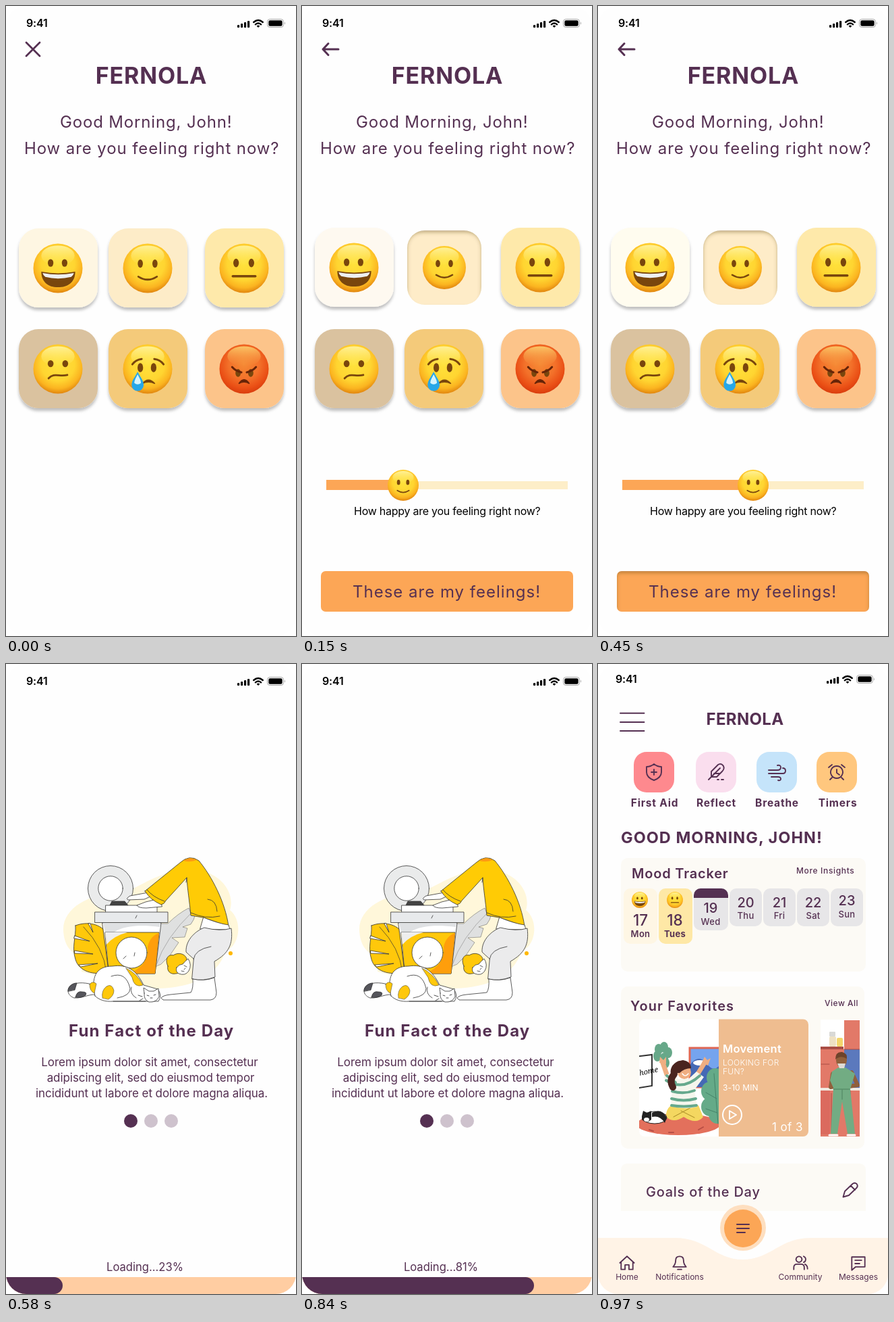
Animation of 430x932 px, one loop 1470 ms. Source, as an HTML page:

```html
<!DOCTYPE html>
<html lang="en">
<head>
<meta charset="utf-8">
<title>Mood check-in</title>
<style>
html,body{margin:0;width:100%;height:100%;overflow:hidden;background:#fff}
svg{display:block;width:430px;height:932px}
text{font-family:Inter,sans-serif;white-space:pre}
</style>
</head>
<body>
<svg id="stage" viewBox="0 0 430 932" xmlns="http://www.w3.org/2000/svg"></svg>
<script>
const INK = '#553052', ORANGE = '#fca656', LOOP = 1470;

const text = (x, y, size, str, o = {}) =>
  `<text x="${x}" y="${y}" font-size="${size}" font-weight="${o.w || 400}" letter-spacing="${o.ls || 0}"
   fill="${o.fill || INK}" text-anchor="${o.mid ? 'middle' : 'start'}"${o.id ? ` id="${o.id}"` : ''}>${str}</text>`;
const rect = (x, y, w, h, r, fill, more = '') =>
  `<rect x="${x}" y="${y}" width="${w}" height="${h}" rx="${r}" fill="${fill}" ${more}/>`;
const disc = (x, y, r, fill, more = '') => `<circle cx="${x}" cy="${y}" r="${r}" fill="${fill}" ${more}/>`;
const oval = (x, y, a, b, fill, more = '') => `<ellipse cx="${x}" cy="${y}" rx="${a}" ry="${b}" fill="${fill}" ${more}/>`;
const shape = (d, fill, more = '') => `<path d="${d}" fill="${fill}" ${more}/>`;
const line = (d, w = 1.9, color = INK) =>
  `<path d="${d}" fill="none" stroke="${color}" stroke-width="${w}" stroke-linecap="round" stroke-linejoin="round"/>`;
const group = (id, body, more = '') => `<g id="${id}" ${more}>${body}</g>`;
const at = (x, y, body, s = 1) => `<g transform="translate(${x} ${y}) scale(${s})">${body}</g>`;

const ramp = (id, stops) => `<radialGradient id="${id}" cx=".5" cy=".4" r=".62">` +
  stops.map(([o, c]) => `<stop offset="${o}" stop-color="${c}"/>`).join('') + '</radialGradient>';
const clip = (id, body) => `<clipPath id="${id}">${body}</clipPath>`;
const defs = `<defs>
  ${ramp('sun', [[0, '#ffe23c'], [.55, '#ffd531'], [.8, '#fbb420'], [1, '#dc7d0c']])}
  ${ramp('rage', [[0, '#f58a35'], [.5, '#f3712a'], [.8, '#ea4f15'], [1, '#d63a0c']])}
  <linearGradient id="gloss" x2="0" y2="1"><stop stop-color="#fff6a8" stop-opacity=".85"/><stop offset="1" stop-color="#fff07a" stop-opacity="0"/></linearGradient>
  <linearGradient id="amber" x2="0" y2="1"><stop stop-color="#fcd06c" stop-opacity=".9"/><stop offset="1" stop-color="#f9a04a" stop-opacity="0"/></linearGradient>
  <filter id="drop" x="-20%" y="-20%" width="140%" height="150%"><feDropShadow dx="0" dy="4" stdDeviation="2.2" flood-opacity=".25"/></filter>
  <filter id="soft" x="-20%" y="-20%" width="140%" height="140%"><feGaussianBlur stdDeviation="3"/></filter>
  ${clip('screen', rect(0, 0, 430, 932, 30, '#000'))}
  ${clip('well', rect(156, 332, 110, 110, 26, '#000'))}
  ${clip('key', rect(28, 836, 374, 60, 7, '#000'))}
  ${clip('fav', rect(61, 525.5, 251, 173.5, 8, '#000'))}
  ${clip('next', '<path d="M388 525H330V699H388Z"/>')}
  ${clip('day', rect(142, 332, 51, 62, 10, '#000'))}
</defs>`;

// Faces are drawn around 0,0 with radius 37.
const BROWN = '#79460d';
const eyes = (x1, x2, y, a, b) => oval(x1, y, a, b, BROWN) + oval(x2, y, a, b, BROWN);
const features = {
  grin: eyes(-11, 10, -8, 4.2, 5.8) +
    shape('M-25 5Q0 10 26 5C26 21 15 28.5 0 28.5S-25 20-25 5Z', BROWN) +
    shape('M-23 7Q0 12 24 7Q23 11 20 13Q0 18-19 13Q-22 11-23 7Z', '#eef0f2'),
  smile: eyes(-11, 11, -7, 3.9, 6.2) + line('M-14 12.5Q0 21.5 14 12.5', 2.8, BROWN),
  flat: eyes(-12, 11, -8, 4.2, 6.4) + line('M-17 12H17', 3.5, BROWN),
  unsure: eyes(-11, 11, -8, 4.4, 5.2) + line('M-14 14C-6 5 2 12 14 9', 3, BROWN),
  cry: eyes(-11, 9, -2, 4.2, 6.8) + line('M-23-7Q-18-14-9-15M10-15Q19-14 24-7', 3, BROWN) +
    shape('M-8 22Q1 11 11 22Q1 17-8 22Z', BROWN, `stroke="${BROWN}" stroke-width="1.5"`) +
    shape('M-15 4C-11 12-6 17-6 24A9 9 0 0 1-24 24C-24 17-19 12-15 4Z', '#27a7e8') +
    shape('M-15 8C-12 14-10 17-10 21Q-15 25-20 21C-20 17-18 14-15 8Z', '#d5f3fb'),
  cross: eyes(-9, 10, 6, 4, 6) + line('M-18-3Q-13 3-4 5M18-3Q13 3 4 5', 3, '#672408') +
    shape('M-8 22Q0 10 8 22Q0 17-8 22Z', '#672408', 'stroke="#672408" stroke-width="1.5"')
};
const face = (kind, x, y, r = 36.5) => {
  const hot = kind === 'cross';
  return at(x, y, disc(0, 0, 37, `url(#${hot ? 'rage' : 'sun'})`) +
    oval(0, -19, 25, 15, `url(#${hot ? 'amber' : 'gloss'})`) + features[kind], r / 37);
};
const card = (kind, x, y, fill, id = '') =>
  rect(x, y, 117, 117, 29, fill, `filter="url(#drop)" ${id && `id="${id}"`}`) + face(kind, x + 58, y + 59);

const status = [0, 1, 2, 3].map(i => rect(343 + i * 5, 28 - i * 2, 3.2, 4 + i * 2, 1, '#000')).join('') +
  text(30, 31, 16, '9:41', { w: 600, ls: -.2, fill: '#000' }) +
  line('M367.2 24Q374 18 380.8 24', 2.4, '#000') + line('M369.8 27.3Q374 23.8 378.2 27.3', 2.3, '#000') +
  shape('M371.6 29.5Q374 27.6 376.4 29.5L374 32Z', '#000') +
  rect(387.5, 19.5, 24, 12, 3.8, 'none', 'stroke="#a5a5a5"') + rect(389.3, 21.3, 20.4, 8.4, 2.3, '#000') +
  shape('M413 23.6Q415 25.5 413 27.5Z', '#aaa');

const inset = (id, x, y, w, h, r) => `<g clip-path="url(#${id})"><rect x="${x - 4}" y="${y - 1}" width="${w + 8}" height="${h + 10}"
  rx="${r}" fill="none" stroke="#5a4010" stroke-opacity=".5" stroke-width="6" filter="url(#soft)"/></g>`;

const ask =
  text(215.5, 115, 34, 'FERNOLA', { w: 700, ls: .8, mid: 1 }) +
  text(80, 180, 24, 'Good Morning, John!', { ls: .84 }) +
  text(27, 219, 24, 'How are you feeling right now?', { ls: .9 }) +
  group('closeIcon', line('M30 54L50 74M50 54L30 74', 2.8)) +
  group('backIcon', line('M54 64H31M39 55.5L31 64L39 72.5', 3)) +
  group('rowOne', card('grin', 19, 329, '#fef6e2', 'first') + card('flat', 295, 329, '#fee9aa')) +
  group('idle', card('smile', 152, 329, '#fdecc8')) +
  card('unsure', 19, 478, '#dac29f') + card('cry', 152, 478, '#f4ca7a') + card('cross', 295, 478, '#fcc48a') +
  group('chosen', rect(156, 332, 110, 110, 26, '#feecc8') + inset('well', 156, 332, 110, 110, 26) +
    face('smile', 211, 387, 32) +
    rect(36, 703, 358, 12, 0, '#fdeec8') + rect(36, 701, 100, 15, 0, ORANGE, 'id="fill"') +
    group('thumb', face('smile', 0, 0, 23)) +
    text(77, 753, 16, 'How happy are you feeling right now?', { ls: -.25, fill: '#000' }) +
    rect(28, 836, 374, 60, 7, ORANGE) + group('pressed', inset('key', 28, 836, 374, 60, 7)) +
    text(75, 875, 24, 'These are my feelings!', { ls: 1 }));

const art = `<g stroke="#333" stroke-width=".8" stroke-linejoin="round" stroke-linecap="round">` +
  shape('M85 394C84 358 130 337 172 340C198 330 230 305 270 304C320 304 340 340 332 364C352 380 346 418 326 424C312 466 270 482 205 480L112 455C112 445 119 441 112 432C94 428 86 414 85 394Z', '#fff7da', 'stroke="none"') +
  disc(333, 428, 3, '#ffb800', 'stroke="none"') +
  disc(155, 332, 33.5, '#eaebeb') + disc(155, 332, 18.2, '#fff') +
  shape('M103 387C121 380 141 385 149 398L152 456C130 461 108 455 103 437C97 418 104 405 103 387Z', '#ffc80b') +
  shape('M102 402L124 410L101 406ZM102 424L129 429L102 428ZM108 445L136 443L111 448ZM122 384L129 397L125 384Z', '#fff') +
  line('M115 389Q145 420 149 456', .7, '#333') +
  shape('M222 447L227 384H240Q255 369 271 361L275 371L281 369Q279 379 274 385L262 389L269 391L265 404L246 405L256 412L243 431L230 444Z', '#dfe0e0', 'stroke-width=".4"') +
  line('M223 445Q236 405 277 366', .5, '#777') +
  shape('M143 383H230L221 458H153Z', '#fff') + shape('M144 383H229L228 389C203 386 175 386 160 397H147Z', '#dfe1e3', 'stroke="none"') +
  shape('M147 397H227L221 458H153Z', '#ffc80b') + shape('M227 398L221 458H183Q213 445 210 418Q214 402 227 398Z', '#ff9e0b', 'stroke="none"') +
  shape('M147 397H180Q160 402 149 415Z', '#eee', 'stroke="none"') + disc(186, 427, 23, '#fff') +
  line('M174 436L178 432M190 432L191 427', .8, '#333') +
  shape('M154 357L157 351H176L181 357Z', '#444') + rect(148, 357, 76, 10.5, 0, '#fff') + rect(132, 367, 108, 15.5, 0, '#e8eaec') +
  line('M192 376L194 372', .8, '#333') +
  shape('M211 338L184 343Q177 347 181 349L205 348L221 341ZM228 347L207 352L194 357Q196 361 208 361L231 359Z', '#fff') +
  shape('M206 336L258 294Q272 281 286 291C305 314 325 352 330 388L292 375L274 372C272 350 269 333 268 316L237 350Q235 355 230 356Q214 349 206 336Z', '#ffcb05') +
  shape('M263 291Q273 284 283 290Q272 294 263 291Z', '#ff9a12', 'stroke="none"') +
  line('M268 316L267 323M209 334Q218 345 235 351M299 348Q312 349 313 366M274 368Q296 378 317 373', .8, '#333') +
  shape('M293 375Q315 384 330 386L332 393Q310 393 288 392Z', '#fff') +
  shape('M278 436Q271 430 267 426C266 407 283 394 294 390Q318 396 334 391C337 415 330 428 309 440L310 463Q292 470 276 466Z', '#ebebec') +
  line('M278 437Q280 422 304 418', .8, '#333') +
  shape('M277 466Q278 480 274 486L244 489Q233 490 230 494L233 497H303Q312 496 312 486L309 464Q293 470 277 466Z', '#fff') +
  shape('M240 447C234 434 243 429 248 431C258 424 272 432 267 442C266 452 258 458 252 458C244 460 238 454 240 447Z', '#ffc80b') +
  shape('M253 449Q257 444 262 444Q266 439 270 436Q276 445 271 454Q266 462 256 458Q251 455 253 449Z', '#fff') +
  line('M264 446L268 448M260 454L264 455M266 450L264 452', .8, '#333') +
  shape('M135 476C119 471 106 470 97 475C88 481 92 491 101 494C116 495 124 486 138 490Z', '#fff') +
  shape('M92 484C92 476 99 472 105 472L102 482ZM103 493Q105 483 113 485Q121 485 118 490Q111 495 103 493Z', '#55555b') +
  shape('M132 491C126 465 132 447 158 447C179 444 193 452 204 475L225 481Q232 490 226 499L159 499C147 500 138 497 132 491Z', '#fff') +
  shape('M143 494Q141 483 149 477Q157 472 160 483Q160 491 152 496ZM124 474Q128 468 134 473L131 487Q124 484 124 474ZM178 450Q194 457 203 475Q190 480 187 464Z', '#ffc80b', 'stroke-width=".5"') +
  line('M156 462Q178 454 184 480Q184 491 165 494M186 478Q183 488 193 494M159 499H207', .8, '#333') +
  shape('M205 487L204 479L212 484L219 484L226 480L227 492Q223 501 212 500Q204 497 205 487Z', '#fff') +
  line('M209 490L212 491M219 490L222 489M214 494L217 494M202 492L196 490M203 495L198 498', .8, '#222') + '</g>';

const load = art +
  text(93, 551, 24, 'Fun Fact of the Day', { w: 700, ls: 1.12 }) +
  ['Lorem ipsum dolor sit amet, consectetur', 'adipiscing elit, sed do eiusmod tempor',
    'incididunt ut labore et dolore magna aliqua.'].map((s, i) =>
    text(213 + i * 1.5, 595 + i * 23, 17, s, { ls: -.06, mid: 1 })).join('') +
  disc(185, 676, 10, INK) + disc(215, 676, 10, '#cec2cd') + disc(245, 676, 10, '#cec2cd') +
  text(206, 898, 16.6, '', { mid: 1, id: 'percent' }) +
  rect(0, 907, 430, 25, 0, '#ffcda2') + rect(-30, 907, 100, 25, 12.5, INK, 'id="bar"');

const tile = (x, fill, icon, name, mid) => rect(x, 130, 60, 60, 19, fill) + at(x + 30, 160, icon) +
  text(mid, 211, 15.5, name, { w: 700, ls: .8, mid: 1 });
const day = (x, h, fill, num, name, mid, y, w = 48, size = 20, bold = 500) => rect(x, 332, w, h, 10, fill) +
  text(mid, y, size, num, { w: 500, mid: 1 }) + text(mid, y + 17.5, 13, name, { w: bold, ls: .3, mid: 1 });

const yoga = `<g clip-path="url(#fav)">` + rect(61, 525, 118, 175, 0, '#fff') +
  shape('M55 581L80 578V624L55 628Z', '#fff', 'stroke="#333" stroke-width="2"') +
  '<text x="62" y="609" font-size="11" font-style="italic" transform="rotate(-12 62 609)" style="font-family:\'Noto Serif\',serif">home</text>' +
  rect(136, 568, 50, 58, 0, '#75a4ee', 'stroke="#df6754" stroke-width="3"') + shape('M137 592Q150 576 162 592T186 585V626H137Z', '#4569b5') +
  oval(151, 590, 10, 4, '#fff') +
  [[90, 570], [98, 567], [104, 575], [88, 580], [98, 583], [100, 590]].map(([x, y]) => oval(x, y, 6, 8, '#67a889')).join('') +
  oval(119, 681, 62, 16, '#e3705c') + line('M76 689L82 691M105 693H112M149 689L156 685', 2, '#b84e45') +
  [[174, 612], [166, 632], [178, 638], [166, 655], [177, 666]].map(([x, y]) => oval(x, y, 13, 14, '#65aa88')).join('') +
  line('M172 606L178 680M160 634L176 643M160 658L177 664', 1, '#468469') +
  shape('M108 653Q100 660 101 670Q112 680 127 670Q146 682 156 670L149 653Z', '#f4d760') +
  line('M112 670L140 655M143 671L123 661', 1, '#a88b25') +
  line('M105 616L96 590M145 611L158 590', 7, '#efae82') +
  shape('M91 590L92 581L97 586L101 581L101 592ZM154 590L158 581L162 586L167 583L163 594Z', '#efae82') +
  shape('M97 611L109 604L119 614H134L146 603L157 611L143 630L147 655Q127 660 108 654L110 629Z', '#f5f6ed') +
  line('M102 609L115 619M101 616Q126 632 151 609M110 632Q127 637 143 631M109 643Q127 648 145 643M109 653Q127 656 146 653', 4, '#66a98d') +
  line('M121 592Q111 597 113 607Q105 615 111 626', 10, '#4a241f') + disc(128, 604, 10, '#efae82') +
  shape('M114 605Q111 588 126 586Q138 588 138 598Q128 598 121 605Z', '#4a241f') + line('M125 606Q129 612 134 606', 1.5, '#fff') +
  oval(84, 671, 18, 9, '#fff', 'stroke="#222"') + shape('M80 664Q94 656 102 671L99 679Q92 667 80 670Z', '#222') +
  shape('M65 669L67 661L73 664L79 661L79 674Q72 681 65 674Z', '#222') + oval(72, 674, 4, 3, '#fff') +
  rect(179, 525, 133, 175, 0, '#efbd90') + '</g>';

const nurse = '<g clip-path="url(#next)">' + rect(330, 526, 58, 174, 0, '#fff') +
  rect(330, 570, 58, 130, 0, '#e27968') + rect(330, 566, 34, 4, 0, '#a94d45') +
  rect(343, 551, 10, 15, 2, '#eee1c3') + rect(354, 553, 9, 13, 2, '#f3d66d') + rect(343, 544, 9, 7, 1, '#d9d9d6') +
  rect(365, 527, 23, 43, 0, '#e27968') + rect(365, 570, 23, 57, 0, '#5b79bd') + rect(330, 627, 58, 4, 0, '#f0e9e0') +
  rect(330, 631, 14, 65, 0, '#db6a5e') + line('M331 592H343M346 635V693M374 631V694M365 570H388', 1, '#aa4c45') +
  line('M348 606L345 626L358 623M376 604L385 623L371 625', 6, '#90603c') +
  shape('M347 603L356 597H367L381 606L377 619L374 629L381 695H370L362 647L355 695H345L349 627L344 616Z', '#72ac83') +
  line('M349 629H373M362 630V644', 1, '#4c815e') + oval(361, 586, 8, 11, '#90603c') +
  shape('M352 585Q352 573 362 574Q370 576 369 584Q360 578 352 585Z', '#6d432b') + shape('M355 591H367L365 598H358Z', '#dedbd4') +
  line('M343 697H355M370 697H381', 3, '#fff') + '</g>';

const icons = {
  shield: line('M0-12Q5-8 11-8V0Q11 8 0 12Q-11 8-11 0V-8Q-5-8 0-12ZM-4 0H4M0-4V4'),
  quill: line('M-11 11L6-6M-7 6V-1L3-11Q8-14 11-9Q13-5 9-1L1 7H-7M-3 2H5M2 11H4M8 11H11'),
  wind: line('M-12-3H1Q6-3 6-7T1-10M-12 2H9Q13 2 13-2T9-6M-8 7H2Q6 7 6 10T2 12'),
  clock: line('M0-9A9 9 0 1 1-.1-9M0-4V1L4 4M-12-7L-7-11M12-7L7-11M-7 8L-10 11M7 8L10 11'),
  home: line('M-11 0L0-10L11 0M-9-1V10H-3V3H3V10H9V-1'),
  bell: line('M-10 6Q-6 2-6-4Q-6-10 0-10T6-4Q6 2 10 6ZM-3 10H3'),
  people: line('M-2-10A4.5 4.5 0 1 1-2.1-10M-10 10V7Q-10 2-5 2H1Q6 2 6 7V10M5-10Q9-8 8-4Q7-1 5-1M7 2Q11 4 11 9'),
  chat: line('M-10-9H10V6H-4L-10 11ZM-5-4H5M-5 1H2')
};
const tab = (icon, x, name) => at(x, 886, icons[icon], .97) + text(x, 911, 12, name, { mid: 1 });

const dash =
  line('M33 72.7H68.5M33 86H68.5M33 99H68.5', 1.9) + text(218, 90, 24, 'FERNOLA', { w: 700, ls: .3, mid: 1 }) +
  tile(53, '#fe898e', icons.shield, 'First Aid', 84) + tile(145, '#fadeee', icons.quill, 'Reflect', 175.5) +
  tile(235, '#c5e4fa', icons.wind, 'Breathe', 265.5) + tile(324, '#ffc77e', icons.clock, 'Timers', 355.5) +
  text(34, 265, 23.5, 'GOOD MORNING, JOHN!', { w: 700, ls: 1 }) +
  rect(34, 287, 363, 168, 10, '#fcfaf5') + text(50, 317, 20, 'Mood Tracker', { w: 600, ls: .8 }) +
  text(294, 310, 12, 'More Insights', { w: 500, ls: .65 }) +
  day(38, 82, '#fef6e4', 17, 'Mon', 63, 386.5, 50, 22.5, 600) + face('grin', 62, 349, 12) +
  day(90, 82, '#fee8a6', 18, 'Tues', 114, 386.5, 50, 22.5, 700) + face('flat', 114, 349, 12) +
  day(142, 62, '#e7e6e8', 19, 'Wed', 167, 368, 51) + rect(142, 332, 51, 14, 0, INK, 'clip-path="url(#day)"') +
  day(195, 56, '#e7e6e8', 20, 'Thu', 219, 359.5) + day(245, 56, '#e7e6e8', 21, 'Fri', 269, 359.5) +
  day(295, 56, '#e7e6e8', 22, 'Sat', 319, 359.5) + day(345, 56, '#e7e6e8', 23, 'Sun', 369, 357) +
  rect(34, 477, 361, 240, 10, '#fcfaf5') + text(48, 513, 20, 'Your Favorites', { w: 600, ls: 1.1 }) +
  text(336, 506, 12, 'View All', { w: 500, ls: .5 }) + yoga + nurse +
  text(185, 575, 16.5, 'Movement', { w: 600, fill: '#fff', ls: .3 }) +
  ['LOOKING FOR', 'FUN?'].map((s, i) => text(185, 594 + i * 13, 12, s, { w: 300, fill: '#fff', ls: .25 })).join('') +
  text(185, 631, 12, '3-10 MIN', { fill: '#fff', ls: .1 }) +
  disc(199, 667, 14, 'none', 'stroke="#fff" stroke-width="2"') + line('M195 661L205 667L195 673Z', 2, '#fff') +
  text(258, 691, 17, '1 of 3', { fill: '#fff', ls: .4 }) +
  shape('M34 809V749Q34 739 44 739H387Q397 739 397 749V809Z', '#fcfaf5') +
  text(71, 788, 20, 'Goals of the Day', { w: 500, ls: .75 }) +
  line('M363.5 788.5L366 780L377.5 769Q380.5 766.5 383.5 769Q386 772 383.5 775L372 786ZM375 772L381 778') +
  shape('M0 849H114C162 849 173 881 215 881S268 849 316 849H430V932H0Z', '#fff3e6') +
  disc(215, 834, 34, '#fedfc0') + disc(215, 835, 28, ORANGE) + line('M206 829H224M206 835H224M206 841H218', 2) +
  tab('home', 43, 'Home') + tab('bell', 121, 'Notifications') + tab('people', 300, 'Community') + tab('chat', 386, 'Messages');

document.getElementById('stage').innerHTML = defs + `<g clip-path="url(#screen)">` +
  rect(0, 0, 430, 932, 0, '#fefefe') + group('ask', ask) + group('load', load) + group('dash', dash) +
  group('status', status) + '</g>';

const el = id => document.getElementById(id);
const show = (id, on) => el(id).setAttribute('display', on ? 'inline' : 'none');
const set = (id, key, val) => el(id).setAttribute(key, val);

function draw(t) {
  const picked = t >= 150, home = t >= 970, loading = t >= 580 && !home;
  show('ask', t < 580);
  show('load', loading);
  show('dash', home);
  set('status', 'transform', home ? 'translate(-4 -3)' : '');
  show('closeIcon', !picked);
  show('idle', !picked);
  show('backIcon', picked);
  show('chosen', picked);
  show('pressed', t >= 450);
  set('rowOne', 'transform', picked ? 'translate(0 -1)' : '');
  set('first', 'fill', t < 150 ? '#fef6e2' : t < 300 ? '#fef9f0' : '#fffcef');

  const knob = t < 300 ? 150 : 230;
  set('fill', 'width', knob - 36);
  set('thumb', 'transform', `translate(${knob} 709)`);

  // The loader advances in 130 ms steps.
  const step = Math.max(0, Math.min(2, Math.floor((t - 580) / 130)));
  set('bar', 'width', 114 + step * 130);
  el('percent').textContent = `Loading...${23 + step * 29}%`;
}

const begin = performance.now();
function tick() {
  draw((performance.now() - begin) % LOOP);
  requestAnimationFrame(tick);
}
draw(0);
tick();
</script>
</body>
</html>
```
